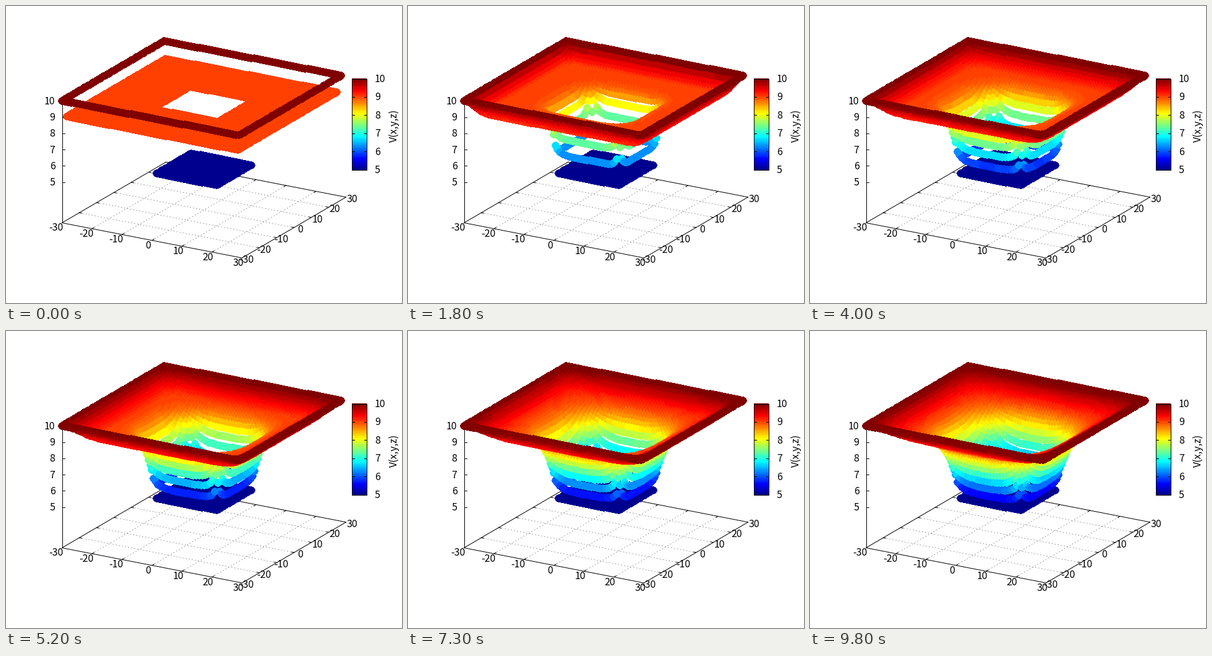
A matplotlib script that plays this animation: 640x480 px, repeating every 9900 ms.

```python
import numpy as np
import matplotlib.pyplot as plt
from matplotlib.animation import FuncAnimation
from matplotlib.colors import ListedColormap
from matplotlib.patches import Rectangle

W, H, DPI = 640, 480, 100
PX = 72 / DPI            # points per pixel
FRAMES, INTERVAL = 99, 100
LOW, HIGH, START = 5, 10, 9
FLOOR = 2.5              # height of the base plane
TEXT = dict(family="Noto Sans CJK JP", fontsize=16 * PX)


def heat_map():
    """Blue-cyan-yellow-red map in 64 steps."""
    k = np.arange(64)

    def ramp(start, end):
        return np.clip(np.minimum(k - start, end - k) / 16, 0, 1)

    return ListedColormap(np.column_stack(
        [ramp(23, 71), ramp(7, 55), ramp(-9, 39)]))


def project(x, y, z=FLOOR):
    """Oblique view of a point, in stage pixels."""
    return (319.5 + 4.85 * x + 2.8 * y,
            329.2 + 0.945 * x - 1.637 * y - 26.3 * (z - FLOOR))


def relax(steps):
    """Jacobi relaxation of the potential; yields its middle slice."""
    v = np.full((60, 60, 60), float(HIGH))
    v[1:-1, 1:-1, 1:-1] = START
    core = (slice(20, 41),) * 3
    v[core] = LOW
    for _ in range(steps):
        yield v[:, :, 30].copy()
        mean = (v[2:, 1:-1, 1:-1] + v[:-2, 1:-1, 1:-1]
                + v[1:-1, 2:, 1:-1] + v[1:-1, :-2, 1:-1]
                + v[1:-1, 1:-1, 2:] + v[1:-1, 1:-1, :-2]) / 6
        v[1:-1, 1:-1, 1:-1] = mean
        v[core] = LOW


HEAT = heat_map()
fig = plt.figure(figsize=(W / DPI, H / DPI), dpi=DPI, facecolor="white")
ax = fig.add_axes([0, 0, 1, 1])


def line(p, q, color="black", **style):
    ax.plot([p[0], q[0]], [p[1], q[1]], color=color, lw=PX, **style)


def label(x, y, text, ha="center"):
    ax.text(x, y + 5.5, text, ha=ha, va="baseline", **TEXT)


def tick(p, step, size=4):
    step = np.array(step) / np.hypot(*step)
    line(p, np.array(p) + size * step)


def draw_base():
    x_dir, y_dir = np.array([4.85, 0.945]), np.array([2.8, -1.637])
    for t in range(-20, 21, 10):
        for p, q in (((t, -30), (t, 30)), ((-30, t), (30, t))):
            line(project(*p), project(*q), "#a0a0a0", dashes=(2, 3), zorder=1)
        tick(project(t, -30), y_dir)
        tick(project(t, 30), -y_dir)
        tick(project(-30, t), x_dir)
        tick(project(30, t), -x_dir)

    corners = [(-30, -30), (30, -30), (30, 30), (-30, 30)]
    for a, b in zip(corners, corners[1:] + corners[:1]):
        line(project(*a), project(*b))

    for t in range(-30, 31, 10):
        x, y = project(t, -30)
        label(x - (9.5 if t < 0 else 6.5), y + 7.5, str(t))
        x, y = project(30, t)
        label(x + (7.5 if t < 0 else 10), y + 2.5, str(t))

    line(project(-30, -30), project(-30, -30, HIGH))
    for z in range(LOW, HIGH + 1):
        x, y = project(-30, -30, z)
        tick((x, y), (1, 0))
        label(79, y, str(z), "right")


def draw_colorbar():
    left, right, top, bottom = 558.5, 582, 117, 264
    ax.imshow(np.linspace(1, 0, 148)[:, None], cmap=HEAT, aspect="auto",
              extent=(left, right, bottom + 0.5, top - 0.5),
              interpolation="nearest", zorder=2)
    ax.add_patch(Rectangle((left, top), right - left, bottom - top,
                           fill=False, lw=PX, zorder=3))
    for v in range(LOW, HIGH + 1):
        y = bottom - (v - LOW) * (bottom - top) / (HIGH - LOW)
        line((left, y), (left + 4, y), zorder=4)
        line((right - 4, y), (right, y), zorder=4)
        label(595.5, y, str(v), "left")
    ax.text(626.5, 192.5, "V(x,y,z)", rotation=90, ha="center", va="center",
            **TEXT)


axis = np.arange(-30, 30)
gx, gy = (g.ravel() for g in np.meshgrid(axis, axis, indexing="ij"))
slices = [s.ravel() for s in relax(FRAMES)]


def place(v):
    return np.rint(np.column_stack(project(gx, gy, v)))


draw_base()
draw_colorbar()
dots = ax.scatter(*place(slices[0]).T, c=slices[0], cmap=HEAT, vmin=LOW,
                  vmax=HIGH, s=(11.2 * PX) ** 2, linewidths=0,
                  antialiased=False, zorder=5)
# integer coordinates fall on pixel centres
ax.set_xlim(-0.5, W - 0.5)
ax.set_ylim(H - 0.5, -0.5)
ax.axis("off")


def update(i):
    dots.set_offsets(place(slices[i]))
    dots.set_array(slices[i])
    return (dots,)


anim = FuncAnimation(fig, update, frames=FRAMES, interval=INTERVAL,
                     repeat=True, repeat_delay=0, blit=False)
plt.show()
```
